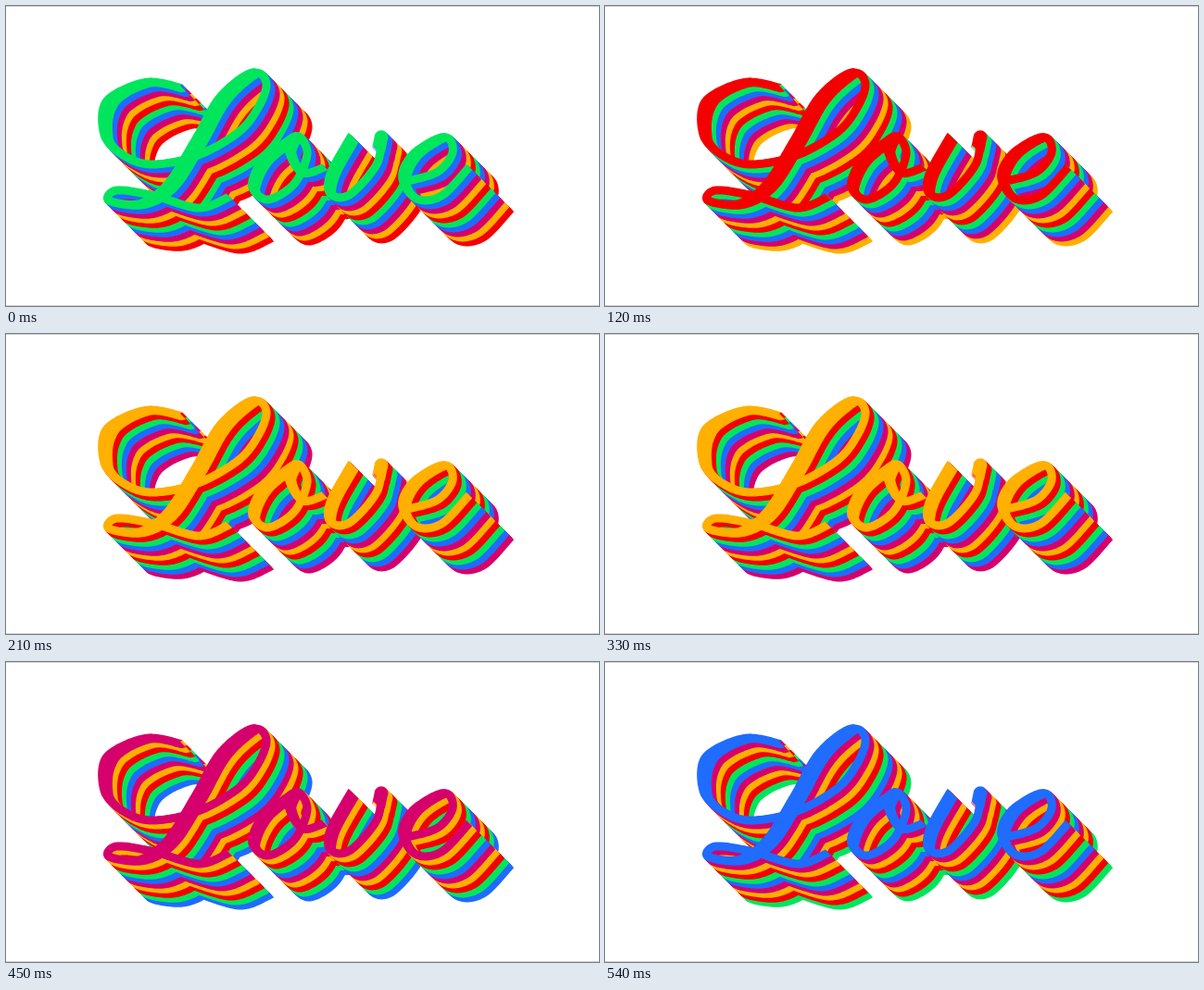
Recreate the animation shown at these times as an HTML page with a canvas. Size 640x324 px, loop 0.57 s.

```html
<!DOCTYPE html>
<html lang="en">
<head>
<meta charset="utf-8">
<title>Love</title>
<style>
  html, body { margin: 0; width: 100%; height: 100%; overflow: hidden; background: #fff; }
  canvas { display: block; }
</style>
</head>
<body>
<canvas id="stage" width="640" height="324"></canvas>
<script>
const WIDTH = 640, HEIGHT = 324;
const LOOP = 570, TICK = 30, TICKS_PER_COLOR = 5;
const DEPTH = 45, BAND = 5;
// Colours from the front face backwards.
const COLORS = ['#00e65c', '#1f6cff', '#d6006c', '#ffb000', '#f50000'];

// The pen is thin, and swells when it moves down and slightly left.
const THIN = 9, DOWNSTROKE = 2;

// Key points of each letter's pen path.
const LETTERS = [
  { swell: 9, path: '191,89 153,83 113,104 109,141 128,162 158,171 205,162 250,137 272,110 281,84 ' +
    '268,73 235,100 208,147 178,194 146,214 111,210 120,199 160,205 208,218 241,206' },
  { swell: 6, path: '311,143 280,168 268,196 283,209 311,192 325,160 316,141 307,156 320,180 344,174' },
  { swell: 6, path: '375,142 353,182 352,204 372,203 400,171 405,142 402,156' },
  { swell: 6, path: '434,189 466,179 482,158 474,142 443,160 430,186 443,208 470,205 500,174' }
];

const ctx = document.getElementById('stage').getContext('2d');

function spline(p0, p1, p2, p3, t) {
  return p1.map((b, i) => {
    const a = p0[i], c = p2[i], d = p3[i];
    return b + t / 2 * (c - a + t * (2 * a - 5 * b + 4 * c - d + t * (3 * (b - c) + d - a)));
  });
}

function sample(points, steps = 20) {
  const line = [];
  const at = i => points[Math.max(0, Math.min(points.length - 1, i))];
  for (let i = 0; i < points.length - 1; i++) {
    for (let s = 0; s < steps; s++) {
      line.push(spline(at(i - 1), at(i), at(i + 1), at(i + 2), s / steps));
    }
  }
  return [...line, at(points.length)];
}

function addLetter(shape, { swell, path }) {
  const line = sample(path.split(' ').map(p => p.split(',').map(Number)));
  const last = line.length - 1;
  const distance = (a, b) => Math.hypot(a[0] - b[0], a[1] - b[1]);

  const ribs = line.map(([x, y], i) => {
    const a = line[Math.max(0, i - 1)], b = line[Math.min(last, i + 1)];
    const angle = Math.atan2(b[1] - a[1], b[0] - a[0]);
    const pressure = Math.max(0, Math.cos(angle - DOWNSTROKE)) ** 3;
    const r = (THIN + swell * pressure) / 2;
    let nx = Math.sin(angle), ny = -Math.cos(angle);
    // Both ends are cut along the direction of the extrusion.
    if (i === 0 || i === last) nx = ny = Math.sign(nx + ny) * Math.SQRT1_2;
    return { r, left: [x + nx * r, y + ny * r], right: [x - nx * r, y - ny * r] };
  });

  line.forEach((p, i) => {
    const { r, left, right } = ribs[i];
    if (i < last) {
      const next = ribs[i + 1];
      shape.moveTo(...left);
      shape.lineTo(...next.left);
      shape.lineTo(...next.right);
      shape.lineTo(...right);
      shape.closePath();
    }
    if (Math.min(distance(p, line[0]), distance(p, line[last])) > r * 1.4) {
      shape.moveTo(p[0] + r, p[1]);
      shape.arc(p[0], p[1], r, 0, Math.PI * 2);
    }
  });
}

const word = new Path2D();
LETTERS.forEach(letter => addLetter(word, letter));

const faces = COLORS.map(color => {
  const face = document.createElement('canvas');
  face.width = WIDTH;
  face.height = HEIGHT;
  const pen = face.getContext('2d');
  pen.fillStyle = color;
  pen.fill(word);
  return face;
});

function draw(shift) {
  const count = COLORS.length;
  ctx.fillStyle = '#fff';
  ctx.fillRect(0, 0, WIDTH, HEIGHT);
  ctx.fillStyle = '#d2d2d2';
  ctx.fillRect(0, 0, WIDTH, 1);
  ctx.fillRect(0, HEIGHT - 1, WIDTH, 1);
  for (let d = DEPTH; d >= 0; d--) {
    const band = Math.ceil(d / BAND);
    ctx.drawImage(faces[(band + count - shift) % count], d, d);
  }
}

let shown = -1;
function frame() {
  const tick = Math.floor(performance.now() % LOOP / TICK);
  const shift = Math.floor((tick + 3) / TICKS_PER_COLOR) % COLORS.length;
  if (shift !== shown) draw(shown = shift);
  requestAnimationFrame(frame);
}
frame();
</script>
</body>
</html>
```
